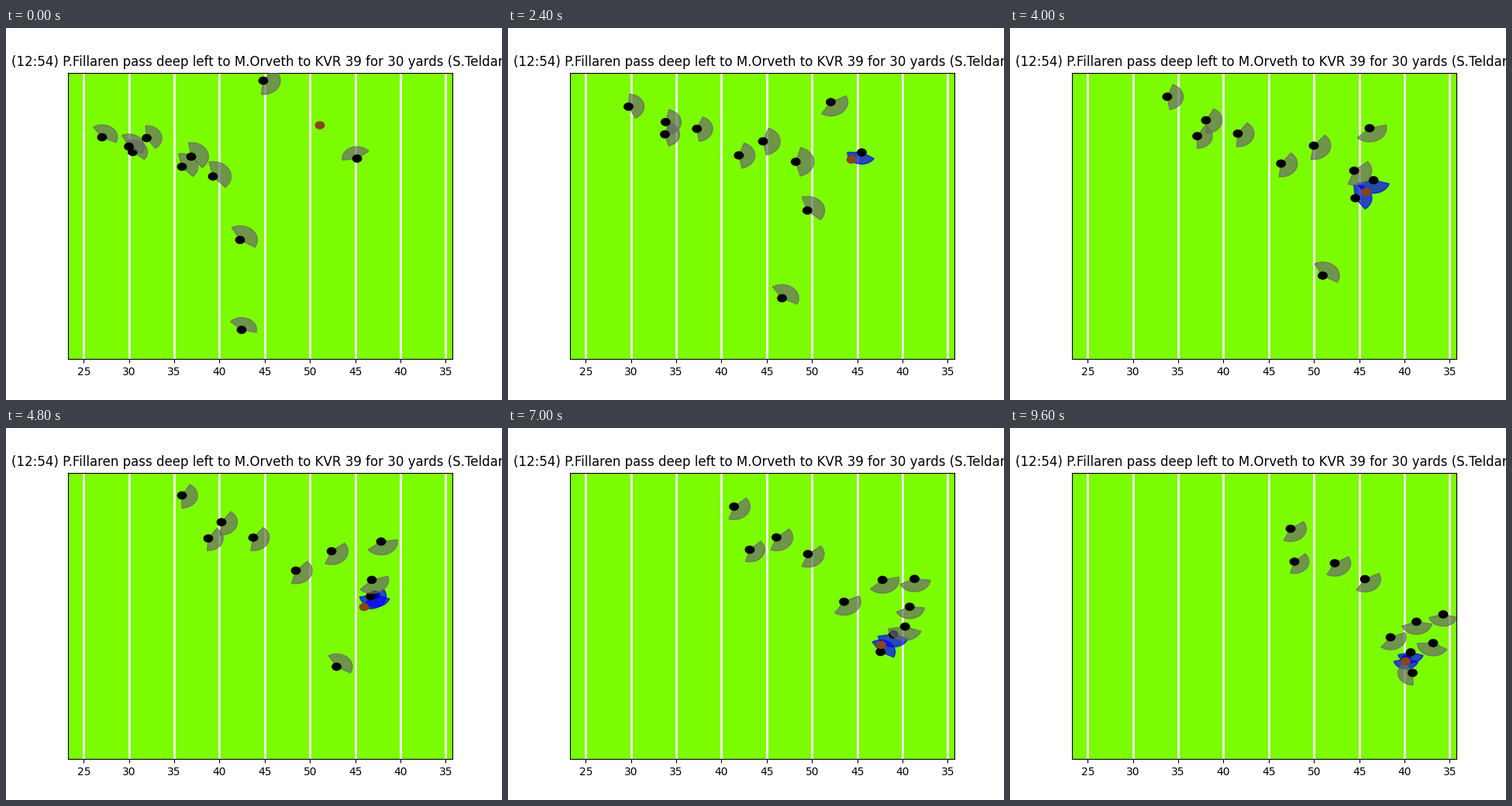
Animation, 640 px wide and 480 px high, one loop 9800 ms. Source, as a matplotlib script:

```python
import numpy as np
import matplotlib.pyplot as plt
from matplotlib.animation import FuncAnimation
from matplotlib.patches import Circle, Wedge

FRAMES, INTERVAL = 49, 200
LEFT, RIGHT, TOP, BOTTOM = 80, 576, 57.6, 427.2
Y_SCALE = 1.235          # the field is drawn slightly flattened
SPAN = 150               # viewing angle in degrees
DOT = 5.7
CRUISE = 4               # speed at which motion and ball pull the gaze equally

T = np.arange(FRAMES)


def smooth(times, v):
    """Cubic Hermite path through a few waypoints."""
    times, v = np.array(times), np.array(v, float)
    slope = np.gradient(v, times, edge_order=2)
    i = np.clip(np.searchsorted(times, T, side="right") - 1, 0, len(v) - 2)
    h = times[i + 1] - times[i]
    s = (T - times[i]) / h
    return ((1 + 2 * s) * (1 - s) ** 2 * v[i] + s * (1 - s) ** 2 * h * slope[i]
            + s ** 2 * (3 - 2 * s) * v[i + 1] + s ** 2 * (s - 1) * h * slope[i + 1])


def field_y(y):
    return (BOTTOM - np.array(y)) * Y_SCALE


def path(times, points):
    xs, ys = zip(*points)
    return smooth(times, xs), smooth(times, field_y(ys))


fig, ax = plt.subplots(figsize=(6.4, 4.8), dpi=100)
ax.set_facecolor("lawngreen")
ax.set_xlim(LEFT, RIGHT)
ax.set_ylim(0, field_y(TOP))
ax.set_yticks([])
yard_lines = 100.35 + 58.37 * np.arange(9)
ax.set_xticks(yard_lines, [50 - abs(50 - y) for y in range(25, 70, 5)])
for x in yard_lines:
    ax.axvline(x, color="white", lw=2)
ax.set_title("(12:54) P.Fillaren pass deep left to M.Orveth to KVR 39 "
             "for 30 yards (S.Teldar)")

ball_x, ball_y = path([0, 8, 16, 24, 31, 40, 48],
                      [(405, 125.5), (430, 150.5), (454, 191), (462, 231),
                       (462.5, 261), (507.5, 298.5), (510.5, 301)])
ball = ax.add_patch(Circle((0, 0), DOT, color="saddlebrown", zorder=20))


class Player:
    """A defender whose gaze lies between his run and the ball."""

    def __init__(self, points, z):
        self.x, self.y = path([0, 8, 24, 40, 48], points)
        vx, vy = (np.gradient(p, edge_order=2) for p in (self.x, self.y))
        dx, dy = ball_x - self.x, ball_y - self.y
        dist = np.hypot(dx, dy)
        self.angle = np.degrees(np.arctan2(vy / CRUISE + dy / dist,
                                           vx / CRUISE + dx / dist))
        self.reach = 15 + 0.9 * np.hypot(vx, vy)      # faster means wider
        turn = (np.degrees(np.arctan2(dy, dx)) - self.angle + 180) % 360 - 180
        self.sees = (dist < self.reach + 6) & (abs(turn) < SPAN / 2)
        self.view = ax.add_patch(Wedge((0, 0), 1, 0, SPAN, alpha=0.7, zorder=z))
        self.dot = ax.add_patch(Circle((0, 0), DOT, color="black", zorder=z))

    def draw(self, n):
        spot = (self.x[n], self.y[n])
        self.dot.center = spot
        self.view.set_center(spot)
        self.view.set_radius(self.reach[n])
        self.view.set_theta1(self.angle[n] - SPAN / 2)
        self.view.set_theta2(self.angle[n] + SPAN / 2)
        self.view.set_color("blue" if self.sees[n] else "dimgray")


# waypoints of each defender, lowest layer first
rush_end = [(124, 141), (139, 112), (227, 87), (320, 112), (362, 130)]
rush_right = [(163.5, 160), (186.5, 141), (261, 142.5), (334, 164), (367, 172.5)]
rush_left = [(158.5, 153), (184, 128), (278, 121.5), (376, 153.5), (419, 174.5)]
rush_wide = [(181.5, 142), (221, 131), (319, 141.5), (416, 174.5), (458, 195)]
backer_left = [(227, 179), (273, 165), (374, 184), (457.5, 243.5), (491, 270)]
backer_mid = [(239, 166), (298, 149), (420, 159), (504, 216.5), (524.5, 250)]
corner_top = [(332, 68), (390, 83), (484, 146.5), (539, 214.5), (559, 240.5)]
safety = [(453, 168.5), (453, 154), (476, 215), (505, 284), (511, 298)]
nickel = [(302, 273.5), (357, 246.5), (470.5, 217), (532.5, 245), (546, 277.5)]
corner_low = [(304, 389.5), (333, 363), (426.5, 308), (499, 286), (517, 289.5)]
backer_right = [(267, 191.5), (335, 174), (472, 196), (519.5, 283.5), (519.5, 316)]

team = [rush_end, rush_right, rush_left, rush_wide, backer_left, backer_mid,
        corner_top, safety, nickel, corner_low, backer_right]
players = [Player(points, z=3 + i) for i, points in enumerate(team)]


def update(n):
    ball.center = (ball_x[n], ball_y[n])
    for player in players:
        player.draw(n)
    return []


anim = FuncAnimation(fig, update, frames=FRAMES, interval=INTERVAL,
                     repeat=True, repeat_delay=0)
plt.show()
```
